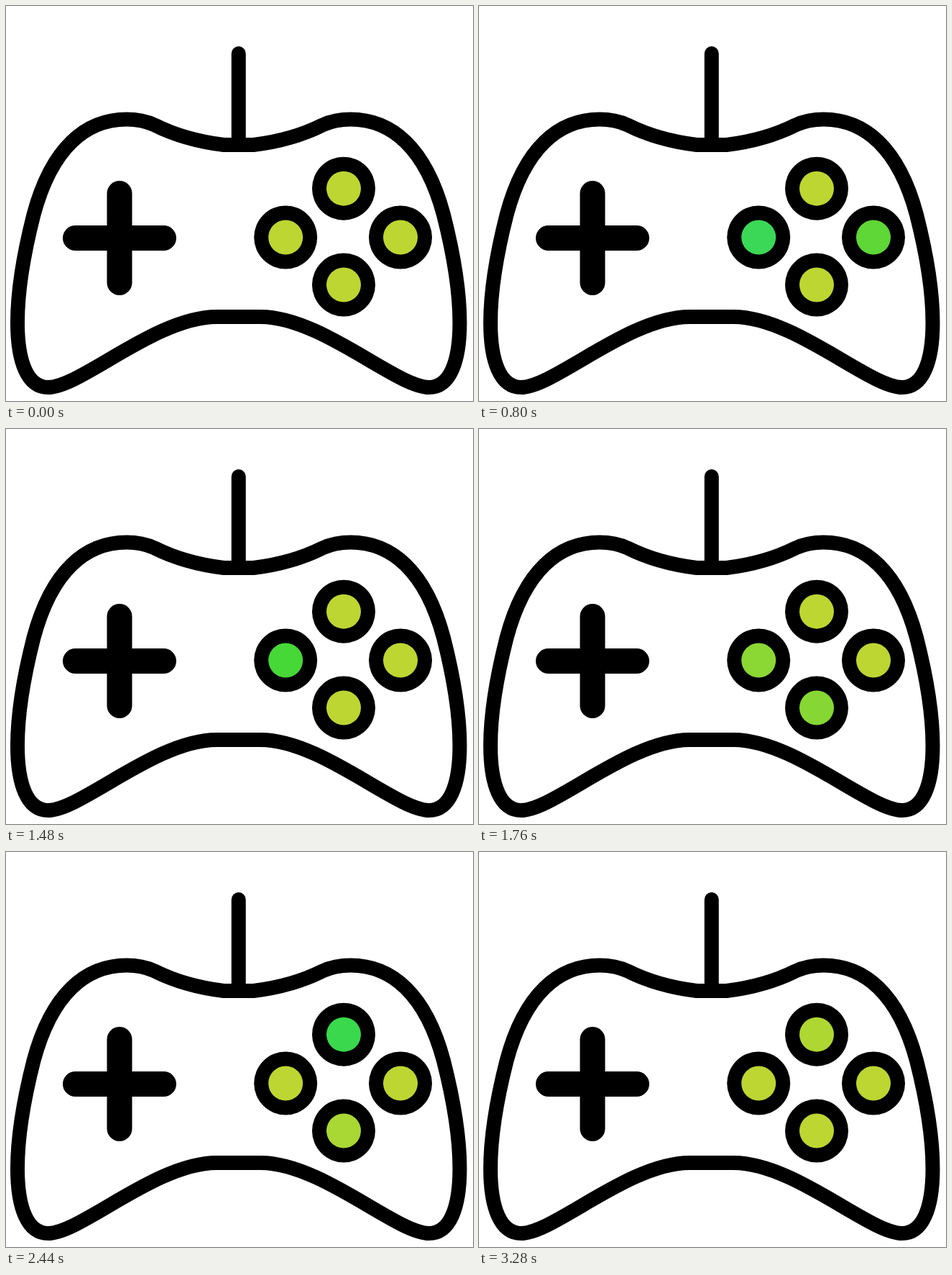
Write an HTML page with a canvas that moves like this. It is 650x549 px and loops after 3320 ms.

```html
<!DOCTYPE html>
<html lang="en">
<head>
<meta charset="utf-8">
<title>Gamepad</title>
<style>
  html, body { margin: 0; width: 100%; height: 100%; overflow: hidden; background: #fff; }
  canvas { display: block; }
</style>
</head>
<body>
<canvas id="stage" width="650" height="549"></canvas>
<script>
const ctx = document.getElementById('stage').getContext('2d');
const LOOP = 3320, STEP = 40, AXIS = 323.75;

// Each glow lists [time in ms, hue shift in degrees].
const buttons = [
  { x: 470, y: 253.7, glow: [[2080, 0], [2520, 71], [2800, 21], [3280, 5], [3320, 0]] },
  { x: 389.2, y: 321.5, glow: [[0, 0], [480, 71], [1040, 54], [1480, 45], [1960, 0]] },
  { x: 549, y: 321.5, glow: [[560, 0], [1040, 71], [1440, 0]] },
  { x: 470, y: 387.5, glow: [[1520, 0], [2040, 44], [2520, 0]] }
];

function shiftAt(keys, t) {
  for (let i = 1; i < keys.length; i++) {
    const [t0, a] = keys[i - 1], [t1, b] = keys[i];
    if (t >= t0 && t <= t1) return a + (b - a) * (t - t0) / (t1 - t0);
  }
  return 0;
}

function glowColor(shift) {
  return `hsl(${69.4 + shift}, 67%, ${51.8 + shift * 0.03}%)`;
}

function disc(x, y, r, color) {
  ctx.fillStyle = color;
  ctx.beginPath();
  ctx.arc(x, y, r, 0, Math.PI * 2);
  ctx.fill();
}

function bar(x0, y0, x1, y1, width) {
  ctx.lineWidth = width;
  ctx.beginPath();
  ctx.moveTo(x0, y0);
  ctx.lineTo(x1, y1);
  ctx.stroke();
}

const half = new Path2D(
  'M324.5 193 H303 C270 189 236 180 207 165.5 C195 160 182 157.5 168 157.5 ' +
  'C111 157.5 63.5 197 38.5 290 C26 339 16 395 16 440 ' +
  'C16 495 30 530 58.5 530 C104 530 209 432 293 432 H324.5');

function drawBody() {
  ctx.lineWidth = 20;
  ctx.lineCap = 'butt';
  ctx.stroke(half);
  ctx.save();
  ctx.translate(2 * AXIS, 0);
  ctx.scale(-1, 1);
  ctx.stroke(half);
  ctx.restore();
}

function draw(t) {
  ctx.fillStyle = '#fff';
  ctx.fillRect(0, 0, 650, 549);
  ctx.strokeStyle = '#000';
  drawBody();
  ctx.lineCap = 'round';
  bar(AXIS, 66, AXIS, 190, 20);
  bar(96.5, 322.5, 219.5, 322.5, 35);
  bar(158, 260.5, 158, 384.5, 35);
  for (const b of buttons) {
    disc(b.x, b.y, 44, '#000');
    disc(b.x, b.y, 24, glowColor(shiftAt(b.glow, t)));
  }
}

const start = performance.now();
function tick() {
  const t = (performance.now() - start) % LOOP;
  draw(Math.floor(t / STEP) * STEP);
  requestAnimationFrame(tick);
}
tick();
</script>
</body>
</html>
```
